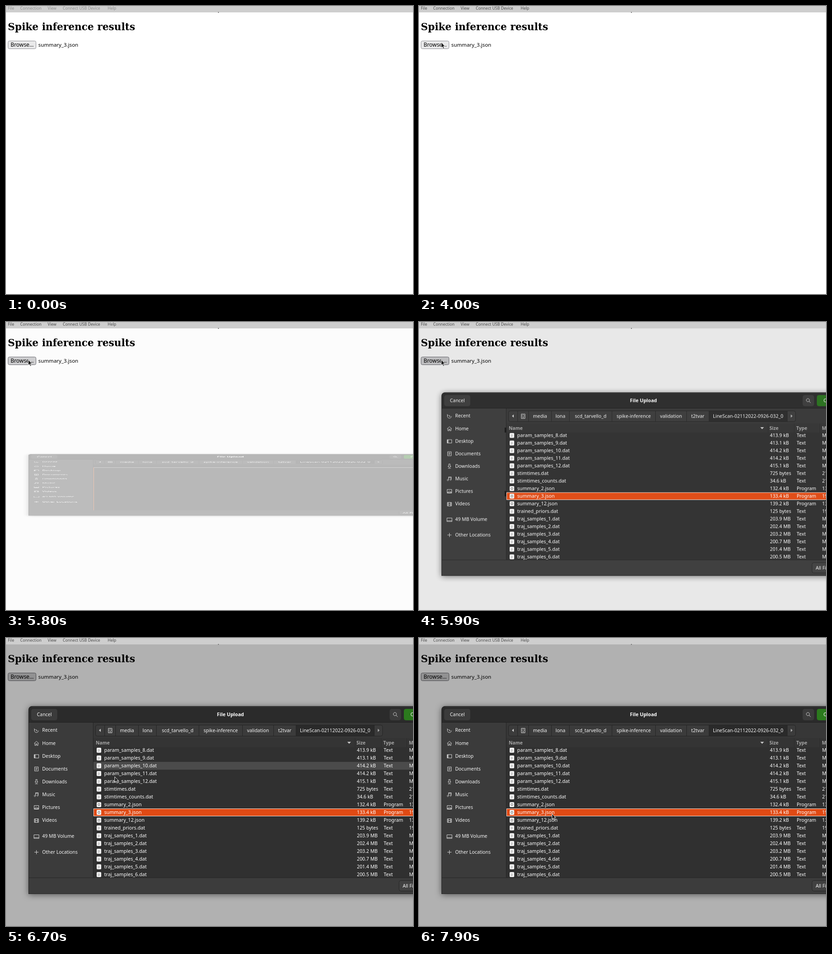
An HTML page with a canvas that plays this animation: 889x630 px, repeating every 8000 ms.

```html
<!DOCTYPE html>
<html lang="en">
<head>
<meta charset="utf-8">
<title>Spike inference results</title>
<style>
html, body { margin: 0; width: 100%; height: 100%; overflow: hidden; background: #fff; }
canvas { display: block; }
</style>
</head>
<body>
<canvas id="stage" width="889" height="630"></canvas>
<script>
const W = 889, H = 630, LOOP = 8000, STEP = 100;
const SANS = '"Noto Sans", "Open Sans", sans-serif';
const SERIF = '"DejaVu Serif", "Noto Serif", serif';
const screen = document.getElementById('stage').getContext('2d');
const layer = document.createElement('canvas');
layer.width = W;
layer.height = H;
const panel = layer.getContext('2d');

const MENU = [['File', 4], ['Connection', 31], ['View', 91], ['Connect USB Device', 124], ['Help', 222]];

// Pointer paths: [time, x, y]; each path is visible until its last time.
const PATHS = [
  [[100, 262, 75], [200, 10, 5], [300, 10, 5]],
  [[2400, 700, 139], [2600, 420, 48], [2800, 150, 2], [3000, 22, 50], [3100, 42, 74],
   [3200, 72, 79], [3400, 40, 78], [3500, 48, 79], [4900, 48, 79], [5000, 65, 82],
   [5100, 48, 82], [6300, 48, 82], [6500, 130, 195], [6600, 200, 278], [6700, 237, 303],
   [6900, 285, 400], [7100, 300, 452], [7300, 298, 457], [7600, 294, 415],
   [7800, 291, 386], [7900, 290, 384], [8000, 290, 384]]
];

const PLACES = [['Recent', 201.5], ['Home', 230], ['Desktop', 258], ['Documents', 286],
  ['Downloads', 314], ['Music', 342], ['Pictures', 370], ['Videos', 398.5],
  ['49 MB Volume', 433.5], ['Other Locations', 468]];

const CRUMBS = [['media', 239, 289], ['lona', 289, 328], ['scd_tarvello_d', 328, 421],
  ['spike-inference', 421, 516], ['validation', 516, 584], ['t2tvar', 584, 633],
  ['LineScan-02112022-0926-032_0', 633, 804]];

const FILES = `param_samples_8.dat|413.9 kB|Mon
param_samples_9.dat|413.1 kB|Mon
param_samples_10.dat|414.2 kB|Mon
param_samples_11.dat|414.2 kB|Mon
param_samples_12.dat|415.1 kB|Mon
stimtimes.dat|725 bytes|21
stimtimes_counts.dat|34.6 kB|21
summary_2.json|132.4 kB|13
summary_3.json|133.4 kB|19
summary_12.json|139.2 kB|13
trained_priors.dat|125 bytes|19
traj_samples_1.dat|203.9 MB|Mon
traj_samples_2.dat|202.4 MB|Mon
traj_samples_3.dat|203.2 MB|Mon
traj_samples_4.dat|200.7 MB|Mon
traj_samples_5.dat|201.4 MB|Mon
traj_samples_6.dat|200.5 MB|Mon`.split('\n').map(s => s.split('|'));
const ROW = 17.06, ROW_TOP = 236.5, SELECTED = 8;

const clamp = (v, lo, hi) => Math.min(hi, Math.max(lo, v));

function rect(c, x, y, w, h, fill) {
  c.fillStyle = fill;
  c.fillRect(x, y, w, h);
}

function box(c, x, y, w, h, r, fill, edge) {
  c.beginPath();
  c.roundRect(x + .5, y + .5, w - 1, h - 1, r);
  c.fillStyle = fill;
  c.fill();
  c.strokeStyle = edge || fill;
  c.lineWidth = 1;
  c.stroke();
}

function label(c, str, x, y, size, color, align = 'left', weight = '', family = SANS) {
  c.font = `${weight} ${size}px ${family}`;
  c.textAlign = align;
  c.fillStyle = color;
  c.fillText(str, x, y);
}

function stroke(c, d, x, y, color = '#d2d2d2') {
  c.save();
  c.translate(x, y);
  c.strokeStyle = color;
  c.lineWidth = 1;
  c.stroke(new Path2D(d));
  c.restore();
}

function shape(c, d, x, y, color) {
  c.save();
  c.translate(x, y);
  c.fillStyle = color;
  c.fill(new Path2D(d));
  c.restore();
}

function pointerAt(t) {
  for (const path of PATHS) {
    for (let i = 1; i < path.length; i++) {
      const [t0, x0, y0] = path[i - 1], [t1, x1, y1] = path[i];
      if (t < t0 || t >= t1) continue;
      const k = (t - t0) / (t1 - t0);
      return [x0 + (x1 - x0) * k, y0 + (y1 - y0) * k];
    }
  }
  return null;
}

function drawPointer(c, [x, y], dark) {
  const arrow = new Path2D('M.5 .5V12.4L3.2 10L5.2 14.6L7.1 13.7L5.2 9.2H8.8Z');
  c.save();
  c.translate(Math.round(x), Math.round(y));
  c.lineWidth = 1;
  c.lineJoin = 'round';
  c.fillStyle = dark ? '#1c1c1c' : '#fff';
  c.strokeStyle = dark ? '#e6e6e6' : '#222';
  c.fill(arrow);
  c.stroke(arrow);
  c.restore();
}

function drawPage(c, t) {
  rect(c, 0, 0, W, H, '#fff');
  label(c, 'Spike inference results', 4, 52.5, 21.4, '#000', 'left', 'bold', SERIF);
  const hot = t >= 5000;
  const pressed = t >= 5500 && t < 5700;
  box(c, 4, 76, 62, 18, 3, pressed ? '#b5b5b9' : hot ? '#d0d0d2' : '#e9e9ea', hot ? '#6c6c72' : '#8f8f95');
  label(c, 'Browse…', 35.2, 89, 11.9, '#000', 'center');
  label(c, 'summary_3.json', 70.5, 89, 11.35, '#000');

  const dim = clamp((t - 5783) * .00076, 0, .305);
  rect(c, 0, 14, W, H - 14, `rgba(0,0,0,${dim})`);

  rect(c, 0, 0, W, 14, '#cecece');
  rect(c, 463, 13, 2, 2, '#777');
  const focus = clamp((t - 3700) / 300, 0, 1);
  const g = Math.round(142 - 68 * focus);
  for (const [str, x] of MENU) label(c, str, x, 8.3, 8.7, `rgb(${g},${g},${g})`);
}

function drawPlaceIcons(c) {
  const icons = [
    'M4.5 0A4.5 4.5 0 1 1 -4 -2.2M0 -2.5V.5H2.5M-4.5 -4.5V-2H-2',
    'M-5 0L0 -4.5L5 0M-3.5 -1V4.5H-1V1H1V4.5H3.5V-1',
    'M-5 -3.5H5V4H-5ZM-2.5 -3.5V4M-4 -3.5V4',
    'M-4 -4.5H4V4.5H-4ZM-2 -2H2M-2 0H2M-2 2H1',
    'M-1.5 -5V0H-3.5L0 3L3.5 0H1.5V-5ZM-3 4.5H3',
    'M-2 3V-4H4V2M-2 -2.5H4M-2 3A1.5 1.5 0 1 1 -2 2.9M4 2A1.5 1.5 0 1 1 4 1.9',
    'M-5 -4H5V4H-5ZM-4 3L-1 -1L1 1L2.5 0L4 3Z',
    'M-4.5 -4H4.5V4H-4.5ZM-2.5 -4V4M2.5 -4V4M-2.5 0H2.5M-4.5 -1.5H-2.5M-4.5 1.5H-2.5M2.5 -1.5H4.5M2.5 1.5H4.5',
    'M-5.5 -4H5.5V4H-5.5ZM-5.5 2H5.5',
    'M-4.5 0H4.5M0 -4.5V4.5'
  ];
  PLACES.forEach(([name, y], i) => {
    stroke(c, icons[i], 66.5, Math.round(y) + .5);
    label(c, name, 79, y + 3.8, 10.35, '#f6f6f6');
  });
}

function drawCrumbs(c) {
  box(c, 195, 190, 628, 25, 4, '#3b3b3b', '#242424');
  rect(c, 633, 191, 171, 23, '#2a2a2a');
  for (const x of [215, 239]) rect(c, x, 191, 1, 23, '#252525');
  for (const [name, x0, x1] of CRUMBS) {
    rect(c, x1, 191, 1, 23, '#252525');
    label(c, name, (x0 + x1) / 2 + .4, 206, 10.45, '#f6f6f6', 'center');
  }
  shape(c, 'M2 -3.5V3.5L-2 0Z', 205, 202, '#c8c8c8');
  shape(c, 'M-2 -3.5V3.5L2 0Z', 814, 202, '#a8a8a8');
  stroke(c, 'M-4 -5H4V5H-4ZM2.2 -1A2.2 2.2 0 1 1 2.2 -1.1M-2 3H2', 227.5, 202.5);
}

function drawFiles(c, hover) {
  rect(c, 191, 219, 698, 20, '#343434');
  for (const [str, x] of [['Name', 196], ['Size', 765.5], ['Type', 824], ['Modified', 880]])
    label(c, str, x, 232.8, 10.2, '#a6a6a6', 'left', 'bold');
  shape(c, 'M-4 -2H4L0 2.5Z', 749.5, 229, '#c4c4c4');
  for (const x of [762, 819, 875]) rect(c, x, 219, 1, 20, '#2b2b2b');

  c.save();
  c.beginPath();
  c.rect(191, 239, 698, 285);
  c.clip();
  FILES.forEach(([name, size, date], i) => {
    const top = Math.round(ROW_TOP + i * ROW), mid = top + 8.5;
    const json = name.endsWith('json');
    if (i === SELECTED) {
      rect(c, 191, top, 698, 17, '#fae3d9');
      rect(c, 192, top + 1, 697, 15, '#e04a14');
    } else if (i === hover) rect(c, 191, top, 698, 17, '#4b4b4b');

    box(c, 198, mid - 5.5, 10, 11, 1, '#f2f2f2');
    if (json) stroke(c, 'M2.2 0A2.2 2.2 0 1 1 2.2 -.1', 203, mid, '#555');
    else stroke(c, 'M-2.5 -1.5H1.5M-2.5 .5H2.5M-2.5 2.5H1', 203, mid, '#aaa');

    const y = mid + 3.7;
    label(c, name, 214.5, y, 10.65, '#fff');
    label(c, size, 766.5, y, 10.35, '#fff');
    label(c, json ? 'Program' : 'Text', 825, y, 10.35, '#fff');
    label(c, date, 880.5, y, 10.35, '#fff');
  });
  c.restore();
}

function drawDialog(c, loaded, hover, settling) {
  c.clearRect(0, 0, W, H);
  c.save();
  c.shadowColor = 'rgba(0,0,0,.5)';
  c.shadowBlur = 14;
  c.shadowOffsetY = 2;
  c.beginPath();
  c.roundRect(49, 149, 882, 411, [8, 8, 0, 0]);
  c.fillStyle = '#262626';
  c.fill();
  c.restore();
  c.beginPath();
  c.roundRect(50, 150, 880, 409, [7, 7, 0, 0]);
  c.fillStyle = '#2b2b2b';
  c.fill();
  rect(c, 57, 150, W, 1, '#404040');

  box(c, 55, 155, 57, 25, 4, '#3b3b3b');
  label(c, 'Cancel', 83.7, 171, 10.4, '#f6f6f6', 'center');
  label(c, 'File Upload', 490.3, 171, 10.6, '#fff', 'center', 'bold');
  box(c, 838, 155, 25, 25, 4, '#3b3b3b');
  stroke(c, 'M2.5 -1A3.5 3.5 0 1 1 2.5 -1.1M1.5 1.5L5 5', 850.5, 167.5);
  box(c, 869, 155, 60, 25, 4, settling ? '#28701d' : '#2b7a1d');
  label(c, 'Open', 883.5, 171, 10.4, '#fff');

  rect(c, 50, 184, W, 1, '#1f1f1f');
  rect(c, 50, 185, 140, 339, '#3b3b3b');
  rect(c, 190, 185, 1, 339, '#252525');
  rect(c, 191, 185, 698, 34, '#373737');
  rect(c, 191, 219, 698, 305, '#303030');
  rect(c, 50, 524, W, 35, '#3c3c3c');
  rect(c, 50, 524, W, 1, '#262626');

  drawPlaceIcons(c);
  drawCrumbs(c);
  if (loaded) drawFiles(c, hover);
  else {
    rect(c, 191, 239, 698, 3, '#8a8a8a');
    rect(c, 191, 239, 1, 285, '#d9672f');
  }
  if (loaded && settling) {
    rect(c, 187, 228, 4, 11, '#1a1a1a');
    rect(c, 187, 370, 4, 12, '#1a1a1a');
  }
  box(c, 858, 530, 80, 24, 4, '#414141', '#262626');
  label(c, 'All Files', 866.5, 545.6, 10.4, '#f6f6f6');
}

function draw(t) {
  drawPage(screen, t);

  // The window unfolds vertically, fading in at the same rate.
  const p = clamp((t - 5773) / 150, 0, 1);
  const open = 1 - (1 - p) ** 2;
  if (open > 0) {
    const last = pointerAt(t - STEP);
    const over = last && last[0] >= 191 && last[1] >= 239;
    const hover = over ? Math.floor((last[1] - ROW_TOP) / ROW) : -1;
    drawDialog(panel, t >= 5900, hover, t < 6400);
    screen.globalAlpha = open;
    screen.drawImage(layer, 0, 357 * (1 - open), W, H * open);
    screen.globalAlpha = 1;
  }

  const at = pointerAt(t);
  if (at) drawPointer(screen, at, t >= 3800);
}

const start = performance.now();
function tick() {
  const t = (performance.now() - start) % LOOP;
  draw(Math.floor(t / STEP) * STEP);
  requestAnimationFrame(tick);
}
tick();
</script>
</body>
</html>
```
